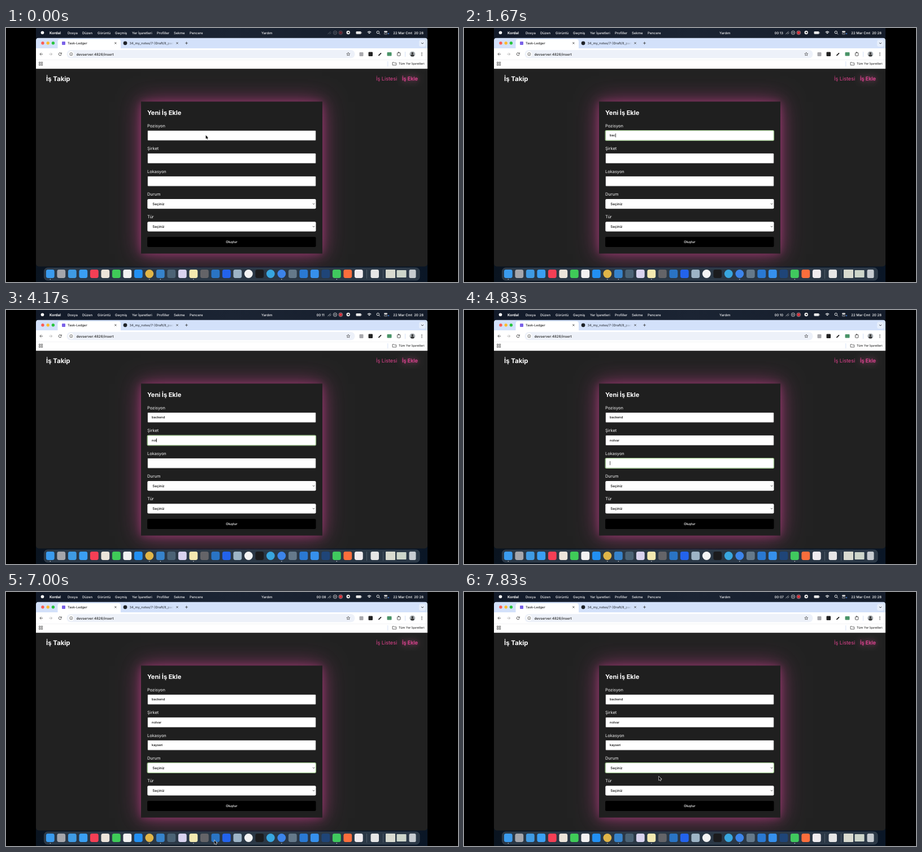
Animation, 800 px wide and 450 px high, one loop 8 s. Source, as an HTML page with a canvas:

```html
<!DOCTYPE html>
<html lang="tr">
<head>
<meta charset="utf-8">
<title>Form</title>
<style>
  html, body { margin: 0; width: 100%; height: 100%; overflow: hidden; background: #000; }
  canvas { display: block; }
</style>
</head>
<body>
<canvas id="stage" width="800" height="450"></canvas>
<script>
const ctx = document.getElementById('stage').getContext('2d');
ctx.textRendering = 'geometricPrecision';
const LOOP = 8000, TICK = 1000 / 6;
const UI = 'Inter, sans-serif';
const PINK = '#e2438f', PAGE = '#212121';

function rect(x, y, w, h, fill, radius = 0) {
  ctx.fillStyle = fill;
  ctx.beginPath();
  ctx.roundRect(x, y, w, h, radius);
  ctx.fill();
}
function frame(x, y, w, h, color, width, radius = 0) {
  ctx.strokeStyle = color;
  ctx.lineWidth = width;
  ctx.beginPath();
  ctx.roundRect(x, y, w, h, radius);
  ctx.stroke();
}
function dot(x, y, r, fill) {
  ctx.fillStyle = fill;
  ctx.beginPath();
  ctx.arc(x, y, r, 0, 7);
  ctx.fill();
}
function ring(x, y, r, color, width = 0.8, from = 0, to = 7) {
  ctx.strokeStyle = color;
  ctx.lineWidth = width;
  ctx.beginPath();
  ctx.arc(x, y, r, from, to);
  ctx.stroke();
}
function path(d, color, x = 0, y = 0, width = 0.8) {
  ctx.save();
  ctx.translate(x, y);
  ctx.strokeStyle = color;
  ctx.lineWidth = width;
  ctx.stroke(new Path2D(d));
  ctx.restore();
}
// y is the middle of the capital letters
function text(str, x, y, size, color, weight = 400, align = 'left') {
  ctx.font = `${weight} ${size}px ${UI}`;
  ctx.textAlign = align;
  ctx.fillStyle = color;
  ctx.fillText(str, x, y + size * 0.36);
  return ctx.measureText(str).width;
}
function blend(x0, x1, ...colors) {
  const gradient = ctx.createLinearGradient(x0, 0, x1, 0);
  colors.forEach((c, i) => gradient.addColorStop(i / (colors.length - 1), c));
  return gradient;
}

const MENU = [['Dosya', 109], ['Düzen', 135], ['Görüntü', 162], ['Geçmiş', 193], ['Yer İşaretleri', 223],
  ['Profiller', 267], ['Sekme', 297], ['Pencere', 325], ['Yardım', 452]];

function menuBar(tick) {
  rect(53, 0, 693, 18, blend(53, 746, '#121a29', '#1b2433', '#141c2a'));
  dot(64.5, 8.3, 2.8, '#fff');
  text('Kordal', 77, 8.5, 6.3, '#fff', 700);
  for (const [label, x] of MENU) text(label, x, 8.5, 5.95, '#f0f0f2', 500);

  ctx.globalAlpha = tick < 1 ? 0.4 : 1;
  if (tick > 0) {
    const left = 15 - Math.floor((tick + 3) / 6);
    text('00:' + String(left).padStart(2, '0'), 549.5, 8.5, 5.9, '#fff', 500);
  }
  path('M-3 2.5 L2 -2 M0 2.5 L3 0', '#ddd', 572.5, 8.3);
  ring(582.5, 8.3, 3.2, '#ddd');
  path('M-1 -1.3 V1.3 M1 -1.3 V1.3', '#ddd', 582.5, 8.3);
  ring(592.3, 8.3, 3.4, '#e8a0a4');
  dot(592.3, 8.3, 2.4, '#f0333d');
  ctx.globalAlpha = 1;

  dot(605.7, 8, 3.2, '#eee');
  dot(606, 8, 1.3, '#333');
  rect(619.5, 6, 9, 4.8, '#e8e8e8', 1.3);
  rect(629, 7.4, 0.8, 2, '#aaa');
  for (const r of [1.6, 3.3, 5]) ring(643, 11, r, '#fff', 1, -2.3, -0.84);
  ring(658.3, 7.6, 2.2, '#fff', 0.9);
  path('M0 0 L2 2', '#fff', 660, 9.3, 0.9);
  rect(669, 5.3, 6, 2.5, '#ddd', 1.3);
  frame(669.3, 8.9, 5.4, 2.2, '#ddd', 0.6, 1.1);
  dot(677, 10, 1, '#4b8df0');
  text('22 Mar Cmt  20:28', 739, 8.5, 6, '#fff', 500, 'right');
}

function browser() {
  rect(53, 17.7, 693, 18.3, '#d3e1fa', [4, 4, 0, 0]);
  ['#fb5d56', '#fcbb2f', '#2ac640'].forEach((c, i) => dot(65 + i * 9.2, 26.8, 2.7, c));
  rect(91.5, 20, 111.5, 20, '#fff', 4);
  rect(99, 24, 6, 6, '#7b62e8', 1);
  text('Task-Ledger', 109, 27, 5.75, '#222', 500);
  dot(211, 26.8, 3.4, '#1f2328');
  text('34_my_notes/7-)Draft/8_pad:', 218.5, 27, 5.7, '#3a3f48', 500);
  rect(282, 21, 17, 12, blend(282, 297, '#d3e1fa00', '#d3e1fa'));
  const cross = 'M-1.6 -1.6 L1.6 1.6 M1.6 -1.6 L-1.6 1.6';
  path(cross, '#333', 193.8, 26.8);
  path(cross, '#333', 303, 26.8);
  path('M-2.3 0 H2.3 M0 -2.3 V2.3', '#333', 319.5, 26.8);
  rect(731, 21, 12, 12, '#e6eefc', 3.5);
  path('M-2 -1 L0 1 L2 -1', '#333', 737, 27, 0.9);

  rect(53, 36, 693, 36.4, '#fff');
  path('M2.7 0 H-2.6 M0 -2.6 L-2.6 0 L0 2.6', '#444', 62.5, 46.3);
  path('M-2.7 0 H2.6 M0 -2.6 L2.6 0 L0 2.6', '#aaa', 79, 46.3);
  ring(95.7, 46.3, 2.5, '#444', 0.9, 0.3, 5.6);
  path('M2.6 -2.8 V-0.6 H0.4', '#444', 95.7, 46.3, 0.9);
  rect(107.5, 39, 510, 14.5, '#edf1f9', 7.2);
  dot(115.3, 46.3, 5, '#fff');
  ring(115.3, 46.3, 2.6, '#444', 0.7);
  path('M0 -.2 V1.5 M0 -1.5 V-.9', '#444', 115.3, 46.3, 0.8);
  text('devserver:4826/insert', 124.5, 46.4, 6.15, '#222', 500);
  path('M0 -3 L.9 -.9 L3 -.8 L1.4 .6 L1.9 2.8 L0 1.6 L-1.9 2.8 L-1.4 .6 L-3 -.8 L-.9 -.9 Z', '#444', 605.8, 46.2, 0.7);

  rect(625.5, 43, 7, 7, '#a9a9ad', 1.2);
  rect(641.5, 42.5, 7.5, 7.5, '#222', 1.2);
  path('M-2.6 2.6 L2 -2', '#222', 662, 46.3, 1.8);
  rect(674.5, 43, 8, 6.5, '#4a9468', 1);
  frame(692.5, 43.8, 5.4, 5.4, '#444', 0.9, 0.8);
  dot(695, 43.4, 1.1, '#444');
  rect(706, 42, 0.7, 9, '#c5d5f2');
  dot(719.3, 46.3, 4.9, '#aab0b4');
  dot(719.3, 44.8, 1.9, '#383838');
  rect(716.2, 47, 6.2, 3.2, '#383838', 1.6);
  for (const y of [43.9, 46.3, 48.7]) dot(736, y, 0.75, '#333');

  rect(53, 56, 693, 0.6, '#e6e8ec');
  for (const x of [58.5, 62.3]) for (const y of [60.3, 64]) frame(x, y, 2.3, 2.3, '#444', 0.7);
  rect(675.5, 59, 0.7, 9, '#c5d5f2');
  path('M-3.2 -2.3 H-.8 L.2 -1.3 H3.4 V2.6 H-3.2 Z', '#444', 687.3, 63.2, 0.8);
  text('Tüm Yer İşaretleri', 695, 63.4, 5.45, '#333', 500);
}

const FIELDS = [
  { label: 'Pozisyon', y: 182, word: 'backend', focus: 2, start: 8, blur: 15 },
  { label: 'Şirket', y: 222.5, word: 'nolvar', focus: 15, start: 23, blur: 29 },
  { label: 'Lokasyon', y: 263, word: 'kayseri', focus: 29, start: 32, blur: 39 },
  { label: 'Durum', y: 303, select: true, focus: 39, blur: 99 },
  { label: 'Tür', y: 343.2, select: true, focus: 99, blur: 99 }
];

function field(f, tick) {
  const focused = tick >= f.focus && tick < f.blur, middle = f.y + 8.2;
  text(f.label, 250, f.y - 8.8, 7.45, '#f4f4f4');
  if (f.select) {
    rect(250.3, f.y, 298.2, 17.3, '#fff', 2);
  } else {
    rect(250.3, f.y - 0.6, 298, 17.8, '#5a5a5a', 1);
    rect(251, f.y, 297.3, 17.2, '#b8b8b8', 1);
    rect(251, f.y, 296.7, 16.4, '#fff', 1);
  }
  if (focused) frame(250.2, f.y - 0.3, 298.2, 17.6, '#a3cc92', 1.3, 2);
  if (f.select) {
    text('Seçiniz', 259.3, middle + 0.3, 6.1, '#000', 500);
    path('M-1.7 -.9 L0 .9 L1.7 -.9', '#333', 544.6, middle + 0.4, 0.8);
    return;
  }
  const typed = f.word.slice(0, Math.max(0, tick - f.start + 1));
  const width = text(typed, 258, middle - 0.2, 5.65, '#000', 500);
  const caretOn = tick >= f.start || (tick - f.focus) % 7 < 3;
  if (focused && caretOn) rect(258 + width, middle - 3.4, 0.7, 7, '#111');
}

function glow(blur, color, draw) {
  ctx.save();
  ctx.shadowBlur = blur;
  ctx.shadowColor = color;
  draw();
  ctx.restore();
}

function page(tick) {
  rect(53, 72.4, 693, 350, PAGE, [0, 0, 5, 5]);
  text('İş Takip', 71, 90, 11.4, '#fff', 700);
  text('İş Listesi', 655, 90, 9.1, PINK);
  glow(12, PINK + 'b0', () => text('İş Ekle', 701, 90, 9.1, PINK));
  glow(5, PINK + '90', () => text('İş Ekle', 701, 90, 9.1, '#d94490'));

  const card = () => rect(239, 130.5, 321, 269, '#1f1f1f');
  glow(38, '#c03d88b0', card);
  glow(13, '#c03d8880', card);
  text('Yeni İş Ekle', 250, 150, 11, '#fff', 700);
  for (const f of FIELDS) field(f, tick);
  rect(250, 370, 298.5, 18, '#000', 2);
  text('Oluştur', 399.3, 379, 5.8, '#fff', 500, 'center');
}

const ICONS = ('#3a9bee #a5a6ab #3f9be4 #3a9ff3 #f43f55 #ece4da #3fcb58 #f2f2f2 #2290f3 #e0b548 ' +
  '#3683cb #4c6375 #d9d3ee #f3e9b0 #646468 #2a74c4 #2363ec #9db4c6 #f4f4f4 #1b1b1d ' +
  '#38a6df #3c84ea #65798a #2a79d2 #3690ec #1f4578 #40c95e #fb6e3c #f0ecef').split(' ');
const ROUND = [9, 18, 20, 21], RUNNING = [0, 9, 10, 13, 21, 26];

function dock() {
  rect(67.5, 425, 664.5, 22, '#2b3846', 6);
  frame(67.5, 425, 664.5, 22, '#445160', 0.6, 6);
  ICONS.forEach((color, i) => {
    const x = 78.3 + i * 19.5;
    if (ROUND.includes(i)) dot(x, 435.5, 7.4, color);
    else rect(x - 7.4, 428.1, 14.8, 14.8, color, 3.4);
    if (RUNNING.includes(i)) dot(x, 445.3, 0.7, '#ddd');
  });
  for (const x of [638, 667]) rect(x, 428, 0.7, 16, '#5d6a78');
  rect(645.5, 428, 14.5, 15, '#e6e6e6', 3);
  rect(672, 428, 17, 15, '#d9dbd0', 1);
  rect(691.5, 429, 17, 13, '#cdd5ca', 1);
  rect(713.5, 428, 12, 15, '#c6cbd0', 2.5);
}

const MOVES = [[369, 440], [368, 442], [364, 420], [356, 384], [348, 343], [345, 327]];

function pointer(tick) {
  if (tick > 0 && tick < 8) {
    path('M-1.4 -3.8 Q0 -3.8 0 -2.8 V2.8 Q0 3.8 -1.4 3.8 M1.4 -3.8 Q0 -3.8 0 -2.8 M0 2.8 Q0 3.8 1.4 3.8', '#222', 353, 190.5, 0.7);
    return;
  }
  const at = tick === 0 ? [353.6, 190] : MOVES[tick - 42];
  if (!at) return;
  const arrow = new Path2D('M0 0 V6.2 L1.4 4.9 L2.5 7.2 L3.5 6.7 L2.5 4.5 H4.4 Z');
  ctx.save();
  ctx.translate(...at);
  ctx.strokeStyle = '#fff';
  ctx.lineWidth = 1.1;
  ctx.stroke(arrow);
  ctx.fillStyle = '#000';
  ctx.fill(arrow);
  ctx.restore();
}

function draw(now) {
  const tick = Math.floor((now % LOOP + 4) / TICK) % 48;
  rect(0, 0, 800, 450, '#000');
  rect(53, 400, 693, 50, blend(53, 746, '#0a1420', '#101c2a', '#0a1626'));
  menuBar(tick);
  browser();
  page(tick);
  dock();
  pointer(tick);
  requestAnimationFrame(draw);
}
requestAnimationFrame(draw);
</script>
</body>
</html>
```
